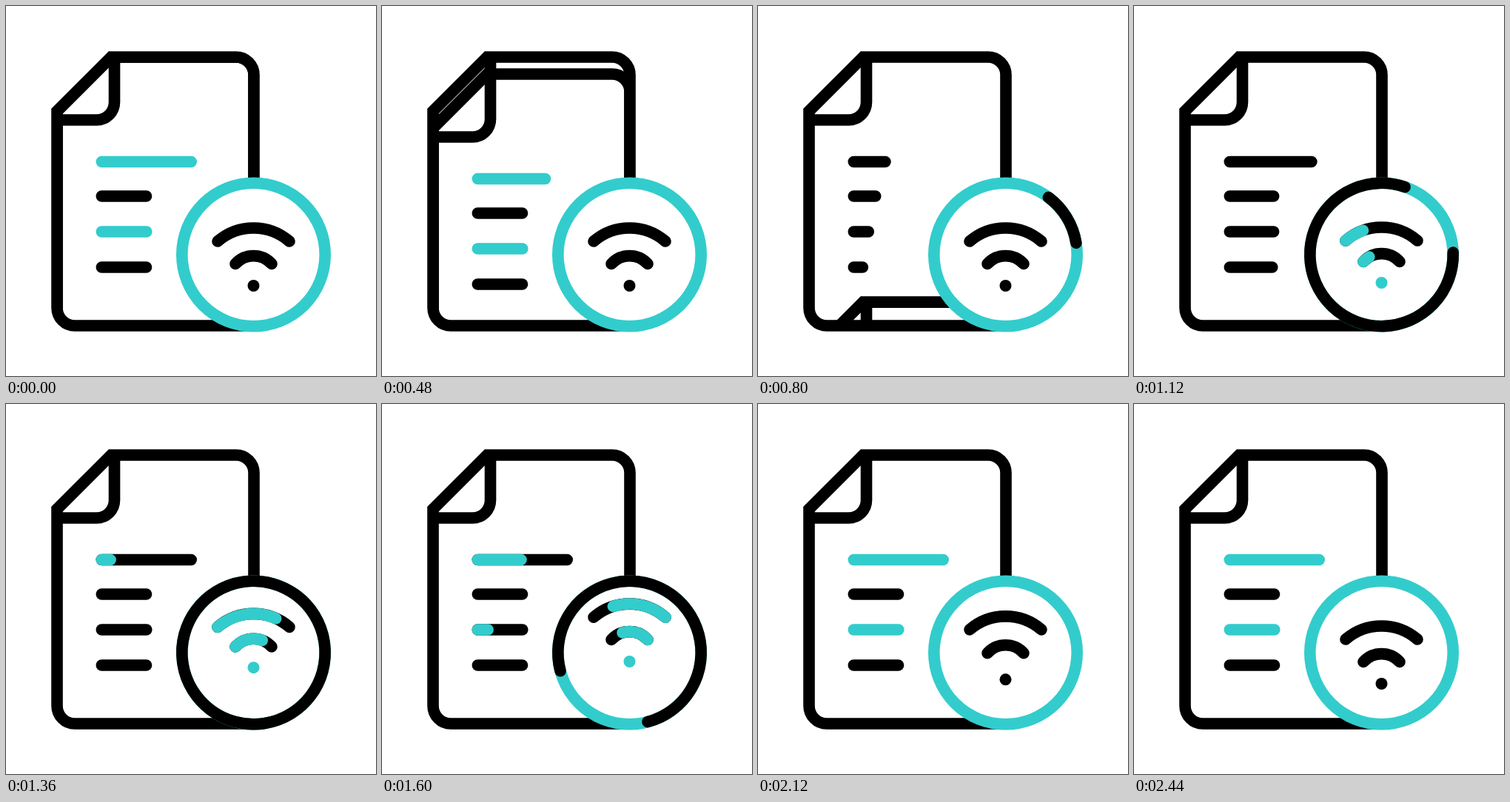
An HTML page that plays this animation: 500 px wide and 500 px high, repeating every 3 s.

```html
<!DOCTYPE html>
<html lang="en">
<head>
<meta charset="utf-8">
<title>Document with wireless badge</title>
<style>
  html, body { margin: 0; width: 100%; height: 100%; overflow: hidden; background: #fff; }
  svg { display: block; width: 100%; height: 100%; fill: none; stroke: #000; stroke-width: 15.6; }
  .round { stroke-linecap: round; }
  .teal { stroke: #33cccc; }
  .white { fill: #fff; }
</style>
</head>
<body>
<svg viewBox="0 0 500 500">
  <defs>
    <path id="outline" d="M69 142 L142 69 H311 a24 24 0 0 1 24 24 V432 H93 a24 24 0 0 1 -24 -24 Z"/>
    <path id="fold" d="M146.5 69 V130 a24 24 0 0 1 -24 24 H69"/>
    <clipPath id="inside"><use href="#outline"/></clipPath>
  </defs>

  <use href="#fold"/>
  <g id="newLines" class="round"></g>

  <g clip-path="url(#inside)">
    <g id="sheet">
      <path class="white" d="M69 142 L142 69 H311 a24 24 0 0 1 24 24 V460 H69 Z"/>
      <use href="#fold"/>
      <g id="oldLines" class="round"></g>
    </g>
  </g>
  <use href="#outline"/>

  <circle class="teal white" cx="334.5" cy="336" r="96.7"/>
  <circle id="ring" class="round" cx="334.5" cy="336" r="96.7" pathLength="1"/>
  <g id="wifi" class="round"></g>
</svg>
<script>
const LOOP = 3000, STEP = 40;
const $ = id => document.getElementById(id);

// Smooth progress from 0 to 1 between two times.
function ease(t, from, to) {
  const s = Math.min(1, Math.max(0, (t - from) / (to - from)));
  return s * s * (3 - 2 * s);
}

function add(parent, tag, attrs) {
  const el = document.createElementNS("http://www.w3.org/2000/svg", tag);
  for (const key in attrs) el.setAttribute(key, attrs[key]);
  return parent.appendChild(el);
}

const stroke = (parent, d, teal) =>
  add(parent, "path", { d, pathLength: 1, class: teal ? "teal" : "" });

function show(el, visible) {
  el.setAttribute("visibility", visible ? "visible" : "hidden");
}

// Shows only the part of a path between two fractions.
function trim(el, start, end) {
  show(el, end - start > 0.001);
  el.setAttribute("stroke-dasharray", `${end - start} 2`);
  el.setAttribute("stroke-dashoffset", -start);
}

const rows = [
  { y: 210.5, end: 250.2, teal: true, hide: [300, 857], grow: [495, 1257], tint: [1204, 2012] },
  { y: 257, end: 189.5, hide: [480, 900], grow: [440, 1171] },
  { y: 305, end: 189.8, teal: true, hide: [520, 940], grow: [569, 1170], tint: [1445, 1945] },
  { y: 353, end: 189.5, hide: [560, 980], grow: [643, 1190] }
];
for (const row of rows) {
  const d = `M129.3 ${row.y} H${row.end}`;
  row.old = stroke($("oldLines"), d, row.teal);
  row.fresh = stroke($("newLines"), d);
  if (row.teal) row.cover = stroke($("newLines"), d, true);
}

const waves = [
  { d: "M286 318 A74.3 74.3 0 0 1 383 318", up: [1060, 1620], down: [1773, 2413], tint: [907, 1547], clear: [1372, 2015] },
  { d: "M310 348.5 A33 33 0 0 1 359 348.5", up: [1011, 1571], down: [1754, 2394], tint: [944, 1584], clear: [1346, 2011] }
];
for (const wave of waves) {
  wave.group = add($("wifi"), "g", {});
  stroke(wave.group, wave.d);
  wave.cover = stroke(wave.group, wave.d, true);
}
const dot = {
  group: add($("wifi"), "g", { stroke: "none" }),
  up: [992, 1552], down: [1658, 2298]
};
dot.mark = add(dot.group, "circle", { cx: 334.5, cy: 378, r: 8 });

function lift(part, t) {
  const y = -30 * (ease(t, ...part.up) - ease(t, ...part.down));
  part.group.setAttribute("transform", `translate(0 ${y})`);
}

function draw(t) {
  $("sheet").setAttribute("transform", `translate(0 ${363 * ease(t, 406, 888)})`);
  $("sheet").setAttribute("display", t < 880 ? "inline" : "none");

  for (const row of rows) {
    trim(row.old, 0, 1 - ease(t, ...row.hide));
    const tint = row.teal ? ease(t, ...row.tint) : 0;
    trim(row.fresh, 0, tint < 1 ? ease(t, ...row.grow) : 0);
    if (row.teal) trim(row.cover, 0, tint);
  }

  const turn = 0.1607 * (t - 571) - 90;
  $("ring").setAttribute("transform", `rotate(${turn} 334.5 336)`);
  trim($("ring"), ease(t, 1379, 2057), ease(t, 661, 1299));

  for (const wave of waves) {
    lift(wave, t);
    trim(wave.cover, ease(t, ...wave.clear), ease(t, ...wave.tint));
  }
  lift(dot, t);
  dot.mark.setAttribute("fill", t >= 960 && t < 2020 ? "#33cccc" : "#000");
}

const begin = performance.now();
function tick() {
  const t = (performance.now() - begin) % LOOP;
  draw(Math.floor(t / STEP) * STEP);
  requestAnimationFrame(tick);
}
tick();
</script>
</body>
</html>
```
